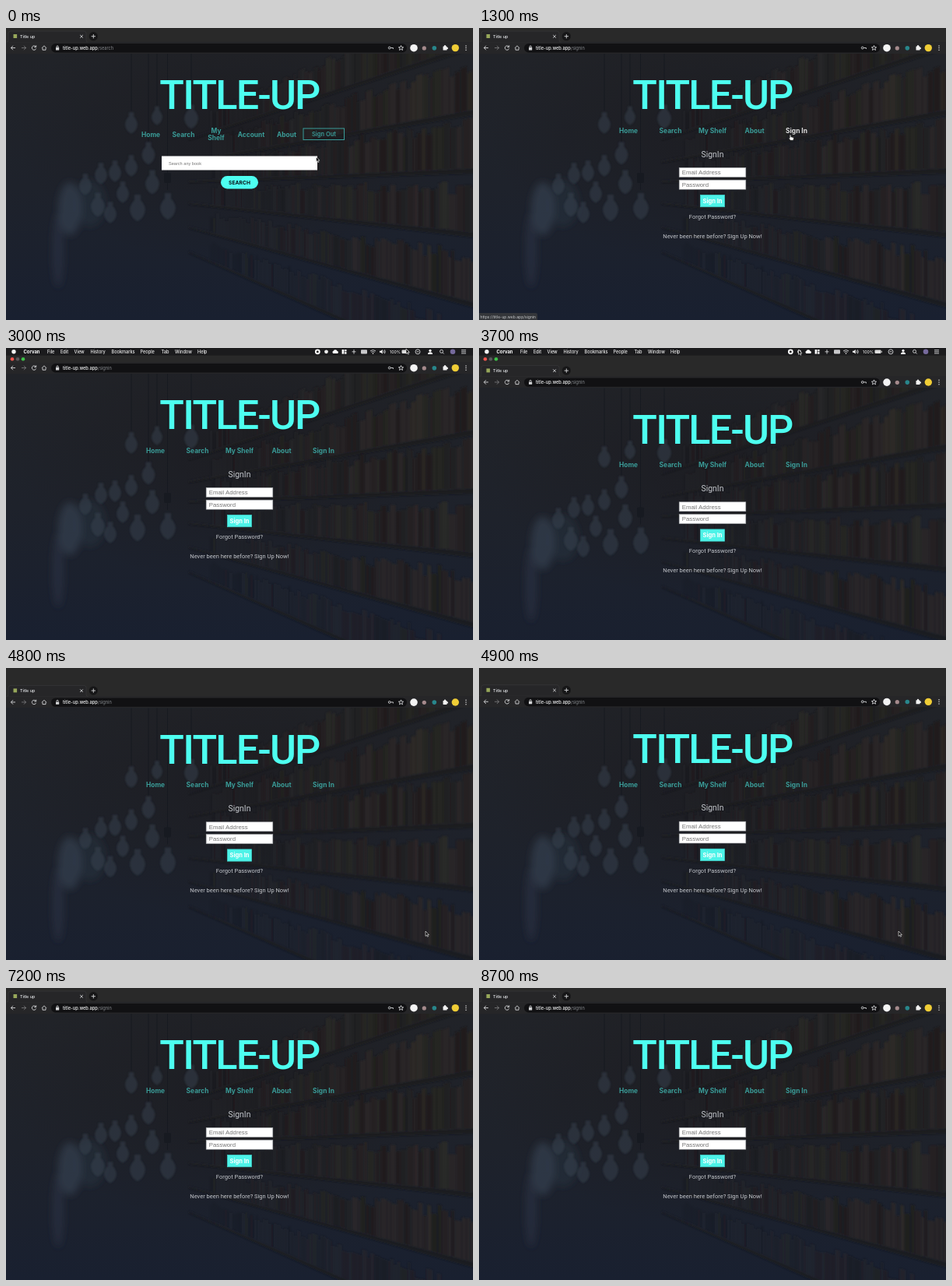
Write an HTML page that moves like this. It is 600 by 375 pixels and loops after 8800 ms.

```html
<!DOCTYPE html>
<html lang="en">
<head>
<meta charset="utf-8">
<title>Title up</title>
<style>
html, body { margin: 0; width: 100%; height: 100%; overflow: hidden; background: #1b2029; }
svg { display: block; width: 600px; height: 375px; }
text { font-family: Inter, sans-serif; white-space: pre; }
.rob { font-family: Roboto, sans-serif; }
.ari { font-family: "Liberation Sans", Arial, sans-serif; }
.b { font-weight: 700; }
.med { font-weight: 500; }
.mid { text-anchor: middle; }
.nav { font-weight: 700; fill: #3a9c98; text-anchor: middle; }
.line { fill: none; stroke: #d5d6d8; stroke-width: .9; }
</style>
</head>
<body>
<svg id="stage" viewBox="0 0 600 375"></svg>
<script>
const LOOP = 8800, SHIFT = 18.4;
const stage = document.getElementById('stage');

// Markup helpers; text is placed by the middle of its capitals
const text = (x, y, size, str, cls = '', fill = '#e8eaed', more = '') =>
  `<text x="${x}" y="${y + size * .36}" font-size="${size}" class="${cls}" fill="${fill}" ${more}>${str}</text>`;
const rect = (x, y, w, h, fill, r = 0, more = '') =>
  `<rect x="${x}" y="${y}" width="${w}" height="${h}" rx="${r}" fill="${fill}" ${more}/>`;
const dot = (x, y, r, fill, more = '') => `<circle cx="${x}" cy="${y}" r="${r}" fill="${fill}" ${more}/>`;
const line = (d, more = '') => `<path class="line" d="${d}" ${more}/>`;
const nav = (x, y, str, id = '') => text(x, y, 8.4, str, 'nav', '', id && `id="${id}"`);
const field = (y, str) =>
  rect(257.2, y, 85.6, 12, '#fff', 0, 'stroke="#a4a7ab" stroke-width=".6"') +
  text(260.8, y + 6.1, 7.8, str, 'ari', '#757575');

let seed = 7;
const rnd = () => (seed = (seed * 16807) % 2147483647) / 2147483647;

// Rows of books that run towards a vanishing point on the left
function shelves() {
  const vx = 46, vy = 205;
  const at = (x, y) => vy + (y - vy) * (x - vx) / (600 - vx);
  let out = '';
  for (const base of [20, 105, 180, 262, 352, 445]) {
    for (let x = 606; x > 265;) {
      const w = (4 + rnd() * 8) * (x - vx) / 554;
      const top = base - 48 - rnd() * 20, l = x - w;
      const alpha = Math.min(.8, (x - 230) / 300) * (base > 400 ? .5 : 1);
      out += `<path d="M${l} ${at(l, top)}L${x - .5} ${at(x, top)}V${at(x, base)}L${l} ${at(l, base)}Z"
        fill="hsl(${rnd() * 25} 7% ${11 + rnd() * 6}%)" opacity="${alpha}"/>`;
      x = l;
    }
    out += `<path d="M235 ${at(235, base)}L606 ${at(606, base)}V${at(606, base + 7)}L235 ${at(235, base + 7)}Z" fill="#18191f" opacity=".7"/>
      <path d="M235 ${at(235, base)}L606 ${at(606, base)}" stroke="#33333a" stroke-width=".8" opacity=".5"/>`;
  }
  return out;
}

function bulb([x, y, s]) {
  return `<path transform="translate(${x} ${y}) scale(${s})" fill="#36424f" opacity=".5"
    d="M-4 -16H4V-9C9 -4 11 2 9 8C7 14 3 17 0 18C-3 17 -7 14 -9 8C-11 2 -9 -4 -4 -9Z"/>`;
}

const bulbs = [[161, 121, .8], [194, 112, .7], [238, 113, .9], [183, 160, .85],
  [161, 176, .8], [140, 183, .8], [188, 197, .9], [150, 210, .8], [122, 186, .8], [169, 230, 1],
  [208, 228, 1], [118, 226, .9], [134, 236, .8], [102, 200, .8]];

const background = `
  ${rect(0, 33, 600, 342, 'url(#night)')}
  ${rect(0, 33, 600, 342, 'url(#warm)')}
  <g filter="url(#blur)">${shelves()}</g>
  <g filter="url(#soft)">
    <ellipse cx="82" cy="232" rx="15" ry="34" fill="#3a4655" opacity=".6"/>
    <ellipse cx="108" cy="225" rx="20" ry="30" fill="#344050" opacity=".3"/>
    <ellipse cx="67" cy="285" rx="7" ry="48" fill="#303b4a" opacity=".5"/>
  </g>
  <path d="M161 33V106M194 33V100M207.5 33V208M183 33V146M238 33V98" stroke="#10141c" stroke-width=".8" opacity=".6"/>
  ${rect(203, 186, 9, 13, '#171a21', 2)}
  <g filter="url(#blur)">${bulbs.map(bulb).join('')}</g>`;

const heading = text(300, 85.5, 52, 'TITLE-UP', 'rob mid med', '#4dfff0', 'letter-spacing="-1.7"');

const searchPage = `<g id="search">
  ${nav(186, 136.5, 'Home')}${nav(228, 136.5, 'Search')}${nav(270, 132, 'My')}${nav(270, 141, 'Shelf')}
  ${nav(315, 136.5, 'Account')}${nav(360.5, 136.5, 'About')}
  ${rect(382, 129, 52.5, 14.5, 'none', 0, 'id="outBox" stroke="#3a9c98"')}
  ${text(408.5, 136.3, 7.5, 'Sign Out', 'mid', '#3a9c98', 'id="out" font-weight="600"')}
  ${rect(200, 164.5, 200, 18, '#fff')}
  ${text(209, 173.5, 5.6, 'Search any book', 'ari', '#757575')}
  ${rect(276, 190, 48, 16.5, '#4dfff0', 8.2)}
  ${text(300, 198.2, 6.7, 'SEARCH', 'mid b', '#0b1018')}</g>`;

const signPage = `<g id="sign">
  ${nav(192, 131.8, 'Home')}${nav(246, 131.8, 'Search')}${nav(300, 131.8, 'My Shelf')}
  ${nav(354, 131.8, 'About')}${nav(408, 131.8, 'Sign In', 'in')}
  ${text(300, 161.8, 10.4, 'SignIn', 'rob mid', '#c4c7cc')}
  ${field(179.4, 'Email Address')}${field(195.2, 'Password')}
  ${rect(284.5, 214.5, 31, 15.2, '#4df3e8', 0, 'stroke="#3fd0c9" stroke-width=".8"')}
  ${text(300, 222.3, 7.5, 'Sign In', 'mid b', '#fff')}
  ${text(300, 242.3, 7.5, 'Forgot Password?', 'rob mid', '#c4c7cc')}
  ${text(300, 267.3, 7.5, 'Never been here before? Sign Up Now!', 'rob mid', '#c4c7cc')}</g>`;

const browser = `
  ${rect(0, -20, 600, 38.5, '#292929')}
  <path d="M0 18.5Q3 18.5 3 15.5V7Q3 4 6 4H100Q103 4 103 7V15.5Q103 18.5 106 18.5Z" fill="#262628" stroke="#3b3b3d" stroke-width=".6"/>
  ${rect(0, 18.2, 600, 14.8, '#262628')}
  ${rect(9.5, 8, 4.6, 5, '#97a75a')}
  ${text(18, 10.8, 5.4, 'Title up', 'med')}
  ${line('M95.2 9L98.8 12.6M98.8 9L95.2 12.6')}
  ${dot(112.3, 10.7, 5.6, '#161617')}${line('M112.3 8V13.4M109.6 10.7H115')}
  ${line('M12 25.5H6.5M9 22.8L6.4 25.5L9 28.2')}${line('M20 25.5H25.5M23 22.8L25.6 25.5L23 28.2', 'opacity=".45"')}
  ${line('M38 23.7A2.7 2.7 0 1 0 38.6 26.4M38.7 22.3V24.6H36.3')}
  ${line('M46 25.8L49 22.8L52 25.8M47 25.5V28.2H51V25.5')}
  ${rect(58, 20, 457, 11.4, '#111113', 5.7)}
  ${rect(64, 25, 4.2, 3.4, '#d5d6d8', .5)}${line('M65 25V24A1.1 1.1 0 0 1 67.2 24V25')}
  ${text(73, 25.8, 5.7, 'title-up.web.app<tspan id="path" fill="#85888c" font-weight="400"></tspan>', 'med', '#f4f5f6')}
  ${dot(492.7, 25.5, 1.4, 'none', 'class="line"')}${line('M494.2 25.5H497.4V27')}
  ${line('M507.5 22.5L508.4 24.6L510.6 24.8L508.9 26.2L509.5 28.4L507.5 27.2L505.5 28.4L506.1 26.2L504.4 24.8L506.6 24.6Z')}
  ${dot(524, 25.7, 4.8, '#f3f3f3')}${dot(537.3, 25.9, 2.6, '#a58a8c')}${dot(550.3, 25.7, 2.8, '#28868b')}
  ${rect(561.5, 23.5, 5, 5, '#f1f1f1', .6)}${dot(564, 23.2, 1.2, '#f1f1f1')}${dot(566.8, 26, 1.2, '#f1f1f1')}
  ${dot(577.3, 25.6, 4.7, '#f0cd36')}
  ${[22.9, 25.6, 28.3].map(y => dot(591, y, .75, '#e0e0e0')).join('')}`;

const menus = [[53, 'File'], [70, 'Edit'], [87.5, 'View'], [108.5, 'History'], [135.5, 'Bookmarks'],
  [172.5, 'People'], [199.5, 'Tab'], [217, 'Window'], [246, 'Help']];

const menuBar = `<g id="bar">
  ${rect(0, 0, 600, 18.4, '#292929')}
  <g id="items">
  ${rect(0, 0, 600, 9.6, '#1b1b1d')}
  ${dot(10, 4.7, 2.7, '#f4f4f4')}
  ${text(22.5, 4.8, 5.9, 'Corvan', 'b', '#fff')}
  ${menus.map(([x, s]) => text(x, 4.8, 5.6, s, 'med', '#f4f4f4')).join('')}
  ${dot(400.3, 4.8, 3.4, '#fff')}${rect(399, 3.5, 2.6, 2.6, '#222', .5)}
  ${dot(411.5, 4.8, 2.4, '#eee')}
  <path d="M420.5 7A1.7 1.7 0 0 1 420.7 3.8A2.6 2.6 0 0 1 425.4 3.8A1.7 1.7 0 0 1 426 7Z" fill="#fff"/>
  ${rect(431.6, 2, 2.7, 5.6, '#fff')}${rect(435, 2, 2.5, 2.4, '#fff')}${rect(435, 5.2, 2.5, 2.4, '#fff')}
  ${line('M447 2V7.6M444.6 4.8H449.4')}
  ${rect(456, 2.2, 8, 5.2, '#c9c9cb', 1)}
  ${line('M468 3.9Q471.5 1 475 3.9M469.4 5.4Q471.5 3.6 473.6 5.4')}${dot(471.5, 7, .8, '#fff')}
  <path d="M480 3.8H481.6L483.7 2V7.6L481.6 5.8H480Z" fill="#fff"/>${line('M485 3.3Q486.4 4.8 485 6.3M486.3 2.3Q488.4 4.8 486.3 7.3')}
  ${text(493, 4.8, 5.3, '100%', '', '#fff')}
  ${rect(508.5, 2.5, 8, 4.6, '#ddd', 1)}${rect(517, 3.8, .8, 2, '#ddd')}
  ${dot(529, 4.8, 3, 'none', 'class="line"')}${line('M527.5 4.8H530.5')}
  ${dot(545, 3.3, 1.6, '#fff')}<path d="M542 8Q542 5.3 545 5.3Q548 5.3 548 8Z" fill="#fff"/>
  ${dot(559.5, 4.3, 2, 'none', 'class="line"')}${line('M561 5.8L562.7 7.5')}
  ${dot(574, 4.8, 3.3, '#766a9c')}
  ${line('M585 2.7H591M585 4.8H591M585 6.9H591')}
  ${dot(8, 14.3, 2.3, '#f1544d')}${dot(15, 14.3, 2.3, '#58585b')}${dot(22, 14.3, 2.3, '#3cc148')}
  </g></g>`;

stage.innerHTML = `<defs>
  <linearGradient id="night" x2="0" y2="1"><stop stop-color="#212328"/><stop offset=".5" stop-color="#1e222b"/><stop offset="1" stop-color="#192030"/></linearGradient>
  <radialGradient id="warm" cx=".52" cy=".3" r=".5"><stop stop-color="#1c1b1f" stop-opacity=".7"/><stop offset="1" stop-color="#1c1b1f" stop-opacity="0"/></radialGradient>
  <filter id="soft" x="-50%" y="-50%" width="200%" height="200%"><feGaussianBlur stdDeviation="5"/></filter>
  <filter id="blur"><feGaussianBlur stdDeviation=".9"/></filter>
  <clipPath id="page">${rect(0, 33, 600, 342)}</clipPath></defs>
  <g id="win"><g clip-path="url(#page)">${background}</g>${browser}${heading}${searchPage}${signPage}</g>
  <g id="status">${rect(-3, 366, 78, 12, '#34363a', 2)}${text(1.5, 371, 5, 'https://title-up.web.app/signin', '', '#c6c8cb')}</g>
  ${menuBar}
  <g id="cursor" stroke-linejoin="round">
  <path id="arrow" d="M0 0V6.4L1.5 5L2.5 7.2L3.5 6.7L2.5 4.6H4.4Z" fill="#0a0a0a" stroke="#fff" stroke-width=".6"/>
  <path id="hand" d="M-.8 4V.8A.8 .8 0 0 1 .8 .8V2.8L3.6 3.5Q4.5 3.8 4.4 4.7L3.9 7.3H.1L-2.1 4.7Q-1.8 3.7 -.8 4.6Z" fill="#fff" stroke="#111" stroke-width=".6"/></g>`;

const $ = id => document.getElementById(id);
const ramp = (t, a, b) => {
  const p = Math.min(1, Math.max(0, (t - a) / (b - a)));
  return p * p * (3 - 2 * p);
};
const show = (id, on) => $(id).style.display = on ? '' : 'none';
const move = (id, x, y) => $(id).setAttribute('transform', `translate(${x} ${y})`);
const glow = p => `rgb(${[58, 156, 152].map(c => c + (225 - c) * p)})`;

// Pointer stops: time, x, y
const stops = [[0, 398.5, 165.5], [100, 398.5, 165.5], [200, 399.5, 152], [300, 399.5, 152], [400, 400, 137],
  [1700, 400, 137], [2600, 514, 1], [3000, 514, 1], [3600, 410, 2], [3900, 412, 2],
  [4400, 575, 272], [4700, 539, 338], [LOOP, 539, 338]];

function pointer(t) {
  const i = Math.max(1, stops.findIndex(s => s[0] >= t));
  const [a, x, y] = stops[i - 1], [b, u, v] = stops[i], p = ramp(t, a, b);
  return [x + (u - x) * p, y + (v - y) * p];
}

function draw(t) {
  const signed = t >= 1100;
  show('search', !signed);
  show('sign', signed);
  $('path').textContent = signed ? '/signin' : '/search';
  const outColor = glow(ramp(t, 300, 500));
  $('out').style.fill = outColor;
  $('outBox').style.stroke = outColor;
  $('in').style.fill = glow(ramp(t, 1000, 1300) - ramp(t, 1800, 2000));
  $('status').style.opacity = ramp(t, 1000, 1300) - ramp(t, 1900, 2200);

  move('win', 0, SHIFT * (ramp(t, 3050, 3500) - ramp(t, 4850, 5300)));
  move('bar', 0, -20 * (1 - ramp(t, 2600, 2950) + ramp(t, 4850, 5300)));
  $('items').style.opacity = 1 - ramp(t, 4350, 4700);

  const hand = t >= 400 && t < 1900;
  show('cursor', t < 5200);
  show('hand', hand);
  show('arrow', !hand);
  move('cursor', ...pointer(t));
}

const start = performance.now();
function tick() {
  const t = (performance.now() - start) % LOOP;
  draw(Math.floor(t / 100) * 100);
  requestAnimationFrame(tick);
}
tick();
</script>
</body>
</html>
```
